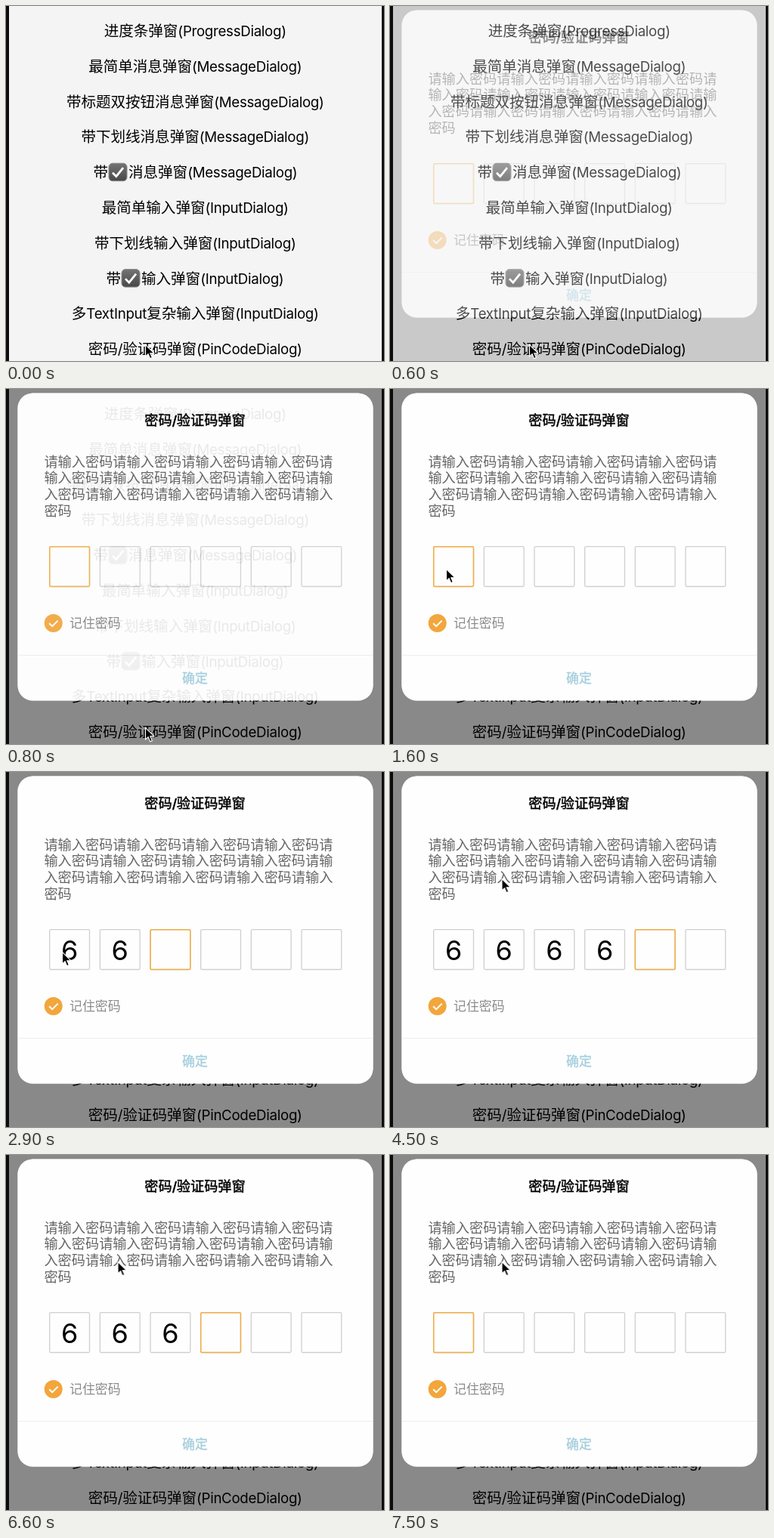
Write an HTML page that moves like this. It is 500 by 470 pixels and loops after 8 s.

```html
<!DOCTYPE html>
<html lang="zh-CN">
<head>
<meta charset="utf-8">
<title>密码/验证码弹窗</title>
<style>
  @property --count { syntax: "<number>"; inherits: true; initial-value: 0; }

  html, body { margin: 0; width: 100%; height: 100%; overflow: hidden; background: #f4f4f4; }
  svg { display: block; width: 500px; height: 470px; }
  text { font-family: "Noto Sans CJK SC", "Noto Sans CJK", sans-serif; white-space: pre; }
  .latin { font-family: Inter, sans-serif; font-size: .954em; letter-spacing: -.27px; }

  #list { font-size: 19.55px; }
  #title { font-size: 18.2px; font-weight: 500; stroke: #000; stroke-width: .45px; }
  #message { font-size: 18.2px; fill: #666; }
  #remember { font-size: 16.9px; fill: #8a8a8a; }
  #confirm { font-size: 16.9px; font-weight: 500; fill: #a6cfdd; stroke: #a6cfdd; stroke-width: .4px; }
  .box { fill: none; stroke: #cfcfcf; stroke-width: 1.3; }
  .focus { stroke: #f0ad45; stroke-width: 1.5; }
  .digit { font: 36px Inter, sans-serif; text-anchor: middle; }

  /* A cell shows its digit once count passes it, and has focus when count equals its index. */
  .digit { opacity: clamp(0, var(--count) - var(--i), 1); }
  .focus { opacity: max(0, 1 - max(var(--count) - var(--i), var(--i) - var(--count))); }

  #dim, #dialog, #copy, #cells, #cursor { animation: 8s step-end -20ms infinite; }
  #dim { animation-name: dim; }
  #dialog { animation-name: appear; }
  #copy { animation-name: copy; }
  #cells { animation-name: typing; }
  #cursor { animation-name: point; }

  @keyframes dim {
    0% { opacity: 0; }
    7.5% { opacity: .4; }
    8.75% { opacity: .78; }
    10%, 100% { opacity: 1; }
  }
  @keyframes appear {
    0% { opacity: 0; }
    7.5% { opacity: .3; }
    8.75% { opacity: .68; }
    10% { opacity: .92; }
    11.25%, 100% { opacity: 1; }
  }
  @keyframes copy {
    0% { opacity: 0; }
    7.5% { opacity: .45; }
    8.75% { opacity: .9; }
    10%, 100% { opacity: 1; }
  }
  @keyframes typing {
    0% { --count: 0; }
    30% { --count: 1; }
    35% { --count: 2; }
    40% { --count: 3; }
    42.5% { --count: 4; }
    62.5% { --count: 5; }
    67.5% { --count: 6; }
    76.25% { --count: 5; }
    80% { --count: 4; }
    82.5% { --count: 3; }
    85% { --count: 2; }
    87.5% { --count: 1; }
    90%, 100% { --count: 0; }
  }
  @keyframes point {
    0% { transform: translate(184px, 448px); }
    15% { transform: translate(172px, 408px); }
    16.25% { transform: translate(152px, 338px); }
    17.5% { transform: translate(130px, 266px); }
    18.75% { transform: translate(90px, 250px); }
    20% { transform: translate(74px, 238px); }
    48.75% { transform: translate(118px, 172px); }
    50%, 100% { transform: translate(147.5px, 141px); }
  }
</style>
</head>
<body>
<svg viewBox="0 0 500 470">
  <defs>
    <linearGradient id="tile" x2="0" y2="1">
      <stop offset="0" stop-color="#747474"/>
      <stop offset="1" stop-color="#484848"/>
    </linearGradient>
    <g id="emoji">
      <rect x=".5" y=".5" width="24" height="23.5" rx="5" fill="url(#tile)" stroke="#8a8a8a"/>
      <path d="M5.5 13l4.8 5L19.5 6.5" fill="none" stroke="#fff" stroke-width="2.8"/>
    </g>
  </defs>

  <rect width="500" height="470" fill="#f4f4f4"/>
  <g id="list"></g>
  <path id="dim" fill="#000" fill-opacity=".44" fill-rule="evenodd"
    d="M0 0H500V470H0ZM35.5 5.5H465.5a20 20 0 0 1 20 20V392.5a20 20 0 0 1-20 20H35.5a20 20 0 0 1-20-20V25.5a20 20 0 0 1 20-20Z"/>
  <path d="M0 0H4V470H0ZM497 0H500V470H497Z" fill="#0c0c0c"/>

  <g id="dialog">
    <rect x="15.5" y="5.5" width="470" height="407" rx="20" fill="#fefefe"/>
    <g id="cells"></g>
    <circle cx="62.7" cy="310" r="12" fill="#f2a63c"/>
    <path d="M57.2 310.2l4 4 7.5-7.6" fill="none" stroke="#fff" stroke-width="2"/>
    <path d="M16 352.5H485" stroke="#ededef"/>
  </g>
  <g id="copy">
    <g id="title"></g>
    <g id="message"></g>
    <g id="remember"></g>
    <g id="confirm"></g>
  </g>

  <path id="cursor" d="M.5.5V16l3.6-3.3 2.5 6 2.7-1.1-2.5-5.9h5Z"
    fill="#000" stroke="#fff" stroke-width="1.1"/>
</svg>

<script>
  const byId = id => document.getElementById(id);
  const add = (id, markup) => byId(id).insertAdjacentHTML('beforeend', markup);

  function write(id, text, x, y, anchor = 'start') {
    const mixed = text.replace(/[\x21-\x7e]+/g, '<tspan class="latin">$&</tspan>');
    add(id, `<text x="${x}" y="${y}" text-anchor="${anchor}">${mixed}</text>`);
  }

  const rows = [
    '进度条弹窗(ProgressDialog)',
    '最简单消息弹窗(MessageDialog)',
    '带标题双按钮消息弹窗(MessageDialog)',
    '带下划线消息弹窗(MessageDialog)',
    '带✓消息弹窗(MessageDialog)',
    '最简单输入弹窗(InputDialog)',
    '带下划线输入弹窗(InputDialog)',
    '带✓输入弹窗(InputDialog)',
    '多TextInput复杂输入弹窗(InputDialog)',
    '密码/验证码弹窗(PinCodeDialog)'
  ];
  rows.forEach((row, i) => {
    const y = 40 + i * 46.8;
    const [before, after] = row.split('✓');
    if (!after) return write('list', row, 250.2, y, 'middle');
    const x = after.includes('Message') ? 135.5 : 152.5;
    write('list', before, x - .5, y, 'end');
    add('list', `<use href="#emoji" x="${x}" y="${y - 19.5}"/>`);
    write('list', after, x + 26.5, y);
  });

  write('title', '密码/验证码弹窗', 250, 48, 'middle');
  const message = '请输入密码'.repeat(13);
  for (let line = 0; line < 4; line++) {
    write('message', message.slice(line * 21, line * 21 + 21), 50.4, 102.5 + line * 21.9);
  }
  write('remember', '记住密码', 84, 316);
  write('confirm', '确定', 250, 388.5, 'middle');

  for (let i = 0; i < 6; i++) {
    const x = 57.7 + i * 66.65;
    const frame = `x="${x}" y="208.7" width="52.8" height="52.8" rx="1.5"`;
    add('cells', `<g style="--i:${i}">
      <rect class="box" ${frame}/>
      <rect class="box focus" ${frame}/>
      <text class="digit" x="${x + 26.4}" y="248.5">6</text>
    </g>`);
  }
</script>
</body>
</html>
```
